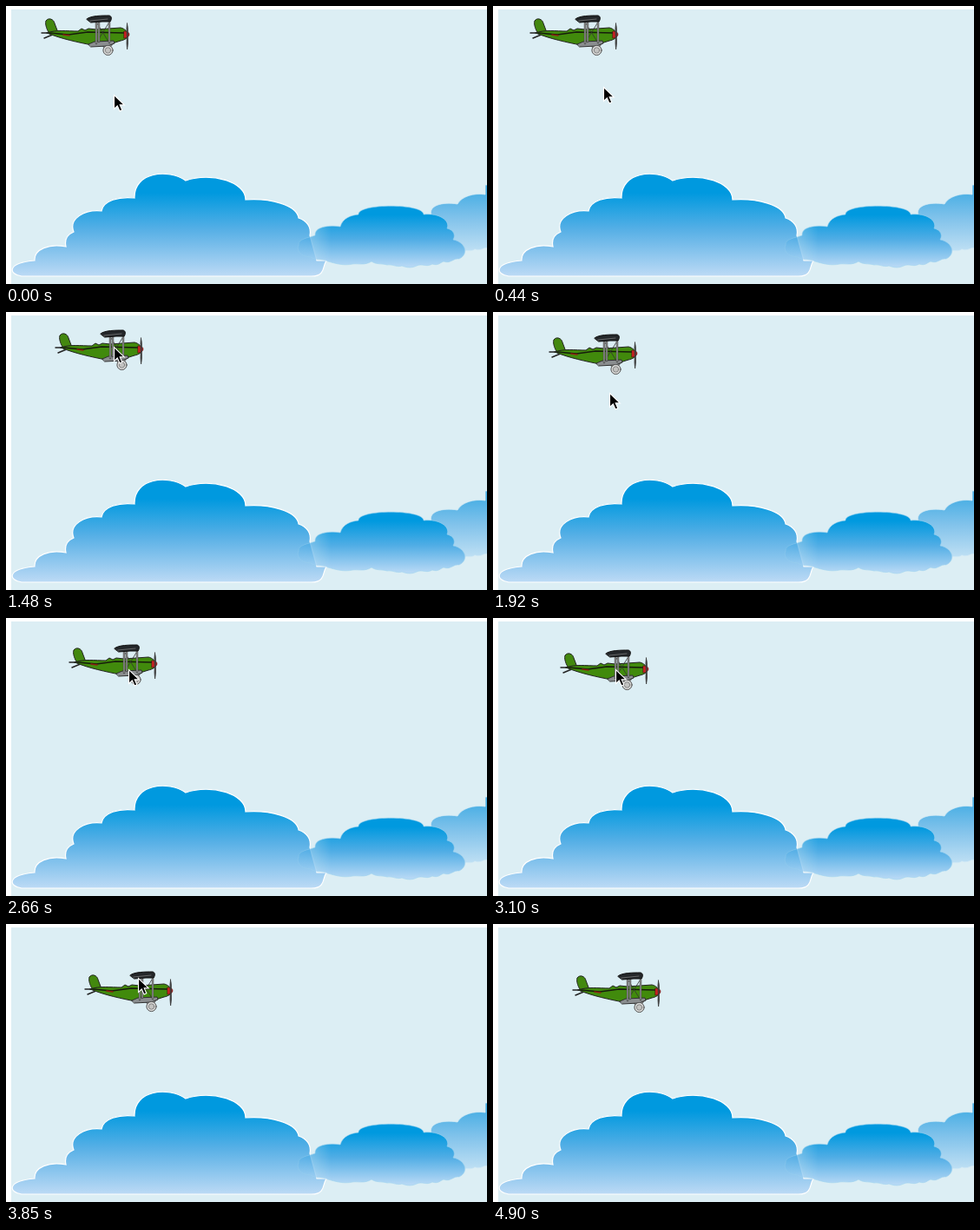
These frames come from a looping animation (554 by 320 pixels, 5.05 s). An HTML page:

```html
<!DOCTYPE html>
<html lang="en">
<head>
<meta charset="utf-8">
<title>Biplane over clouds</title>
<style>
  html, body { margin: 0; width: 100%; height: 100%; overflow: hidden; background: #fff; }
  svg { display: block; width: 554px; height: 320px; }
</style>
</head>
<body>
<svg viewBox="0 0 554 320">
  <defs>
    <linearGradient id="big" gradientUnits="userSpaceOnUse" x1="0" y1="194" x2="0" y2="311">
      <stop offset=".18" stop-color="#0099df"/>
      <stop offset=".55" stop-color="#58b0e6"/>
      <stop offset="1" stop-color="#bcdaf5"/>
    </linearGradient>
    <linearGradient id="mid" gradientUnits="userSpaceOnUse" x1="0" y1="230" x2="0" y2="300">
      <stop offset=".15" stop-color="#0099df"/>
      <stop offset=".55" stop-color="#50ade5"/>
      <stop offset="1" stop-color="#b8d9f5"/>
    </linearGradient>
    <linearGradient id="far" gradientUnits="userSpaceOnUse" x1="0" y1="206" x2="0" y2="284">
      <stop offset=".1" stop-color="#48aee4"/>
      <stop offset=".5" stop-color="#82c3eb"/>
      <stop offset="1" stop-color="#c2e1f4"/>
    </linearGradient>
    <linearGradient id="fade" gradientUnits="userSpaceOnUse" x1="336" y1="0" x2="374" y2="0">
      <stop offset="0" stop-color="#fff" stop-opacity=".5"/>
      <stop offset="1" stop-color="#fff"/>
    </linearGradient>
    <mask id="soft" maskUnits="userSpaceOnUse" x="330" y="220" width="210" height="90">
      <rect x="330" y="220" width="210" height="90" fill="url(#fade)"/>
    </mask>
  </defs>

  <rect x="6" y="4" width="548" height="316" fill="#dceef4"/>

  <path fill="url(#far)" stroke="#d4ebf5" stroke-width=".7" d="M490 241C486 230 502 225 520 228C525 219 539 215 552 217V206H556V279C549 277 548 283 540 280C536 283 532 281 528 282L500 285Z"/>
  <path fill="url(#big)" stroke="#fff" stroke-width="1.2" d="M18 311C3 309 0 296 33 293C32 280 50 273 69 277C67 268 71 263 78 260C72 245 90 234 110 236C112 224 130 219 148 221C147 191 187 187 207 201C236 191 276 202 276 223C304 221 335 229 337 244C346 247 352 254 350 264L358 293H370C364 295 370 311 352 311Z"/>
  <path mask="url(#soft)" fill="url(#mid)" stroke="#9dd2ef" stroke-width=".6" d="M371 294C363 290 357 294 351 289C339 289 334 281 337 275C336 268 348 267 356 264C355 254 372 252 385 254C388 244 397 241 406 240C405 227 481 227 481 240C499 238 512 247 508 256C516 258 518 264 515 269C530 272 533 286 522 291C515 290 512 297 504 294C499 296 498 299 491 297C484 301 479 296 473 299C467 302 461 301 456 299C450 301 445 297 439 298C432 296 427 298 421 294C413 299 405 296 399 297C390 299 381 297 371 294Z"/>

  <g id="plane" stroke-linecap="round" stroke-linejoin="round">
    <g fill="none" stroke="#222">
      <path stroke-width="1.4" d="M41 31H55M44 37L56 32"/>
      <path stroke="#777" stroke-width="1.6" d="M109 44L117 51M123 43L118 50"/>
    </g>
    <path fill="#43880f" stroke="#222" stroke-width="1" d="M49 30C46 25 45 20 46 17C49 13 55 15 56 20L59 28L62 32Z"/>
    <path fill="#418a0c" stroke="#222" stroke-width="1" d="M47 31C58 27 70 29 83 29L87 26L91 28L95 26L104 27L132 25C137 26 140 30 141 33C140 37 137 39 132 40L116 45L99 45C84 42 64 38 47 31Z"/>
    <path fill="none" stroke="#161c0c" stroke-width="1.5" d="M50 31L72 33L94 30L136 31"/>
    <path fill="none" stroke="#8c1f12" stroke-width="1.5" d="M66 33L73 34"/>
    <path fill="#8b8e90" stroke="#303030" stroke-width="1" d="M95 44L102 41L124 40L125 43L117 46L98 47Z"/>
    <g fill="none">
      <path stroke="#333" stroke-width=".8" d="M105 20L118 41M118 20L105 41"/>
      <path stroke="#444" stroke-width="2.4" d="M104 19V43M107 18V41M119 17V42"/>
      <path stroke="#aaa" stroke-width="1" d="M104 19V43M107 18V41M119 17V42"/>
    </g>
    <path fill="#24272a" stroke="#111" stroke-width="1" d="M93 15C97 11 111 11 119 11C122 12 122 15 120 18L111 18L98 19Z"/>
    <path fill="none" stroke="#777" stroke-width=".8" d="M97 17L117 15"/>
    <circle cx="117.5" cy="51" r="5.6" fill="#d8d8d6" stroke="#555" stroke-width="1"/>
    <circle cx="117.5" cy="51" r="3.2" fill="#c3c3c1" stroke="#777" stroke-width=".8"/>
    <path fill="#c52222" stroke="#511" stroke-width=".6" d="M136 29Q142 29 142 33Q141 37 136 37Z"/>
    <path fill="#4b4b4b" stroke="#333" stroke-width=".7" d="M139.5 20Q141 25 140.3 34Q141 44 139.6 50Q138.5 44 139.3 34Q138.4 25 139.5 20Z"/>
  </g>

  <path id="cursor" fill="#000" stroke="#fff" stroke-width="1.1" d="M.5 .5V16.5L4.3 13L7 19L9.8 17.8L7.2 11.9H12.3Z"/>
</svg>
<script>
  const LOOP = 5050, STEP = 148, LEAD = 10;

  // Each key is [step, x, y].
  const planePath = [[0, 0, 0], [3, 2, 0], [8, 8, 4], [10, 16, 10], [16, 32, 19.5],
    [19, 32, 19.5], [23, 41, 32], [26, 50, 44], [27, 51, 45]];
  const cursorPath = [[0, 124, 102], [1, 125, 100], [3, 127, 93], [8, 125, 50], [10, 124, 40],
    [14, 137, 110], [16, 146, 102], [17, 147, 85], [18, 141, 59], [23, 141, 59], [26, 152, 62],
    [27, 260, 108], [28, 360, 150], [29, 360, 150], [32, 499, 301], [33, 512, 330]];

  const plane = document.getElementById('plane');
  const cursor = document.getElementById('cursor');

  function at(path, k) {
    const i = path.findIndex(p => p[0] >= k);
    if (i < 0) return path[path.length - 1].slice(1);
    if (i === 0) return path[0].slice(1);
    const a = path[i - 1], b = path[i], u = (k - a[0]) / (b[0] - a[0]);
    return [a[1] + (b[1] - a[1]) * u, a[2] + (b[2] - a[2]) * u];
  }

  function place(el, path, k) {
    const [x, y] = at(path, k).map(Math.round);
    el.setAttribute('transform', `translate(${x} ${y})`);
  }

  function draw() {
    const k = Math.min(33, Math.floor((performance.now() % LOOP + LEAD) / STEP));
    place(plane, planePath, k);
    place(cursor, cursorPath, k);
    requestAnimationFrame(draw);
  }
  draw();
</script>
</body>
</html>
```
